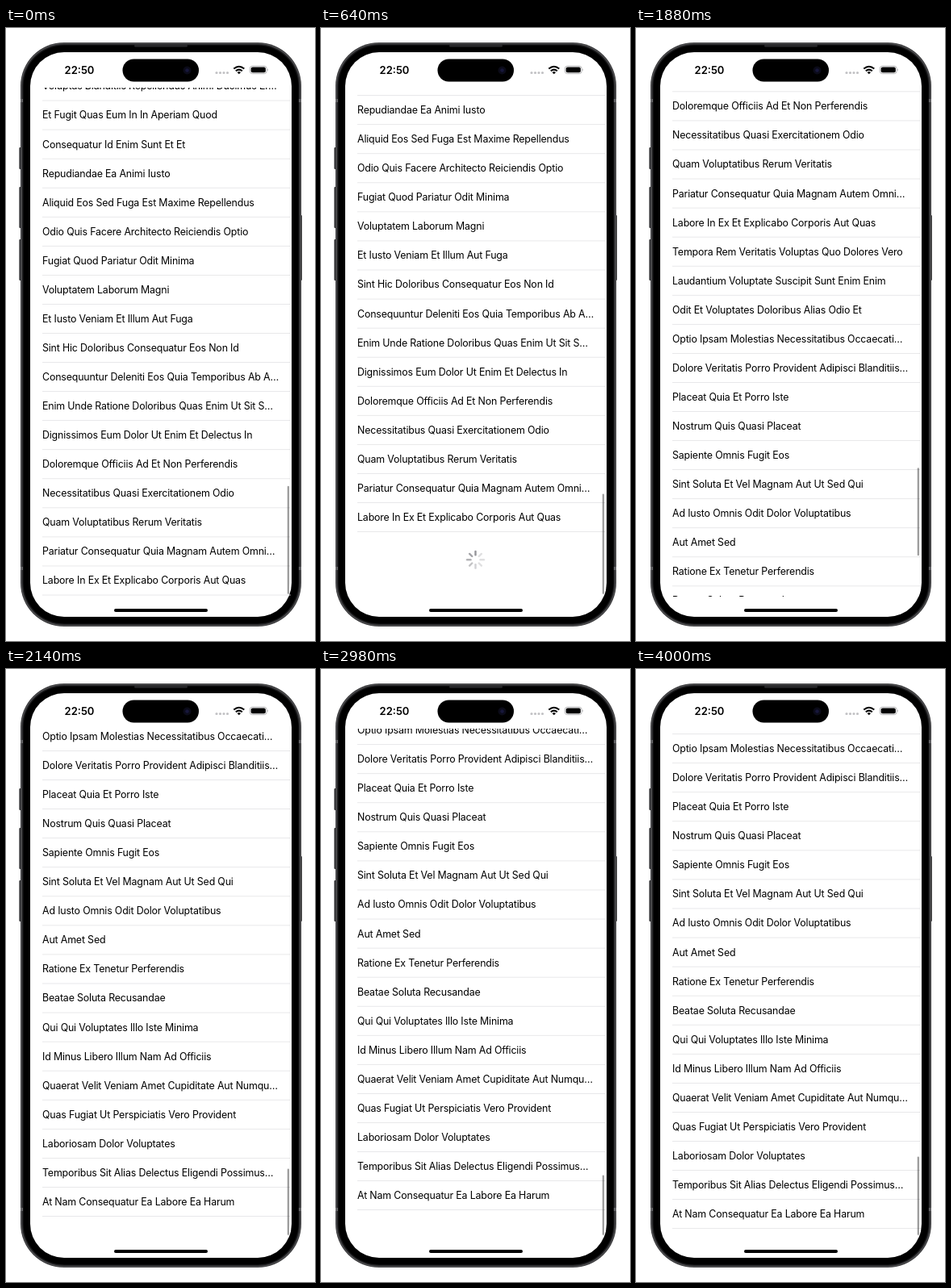
Animation, 383 px wide and 760 px high, one loop 4020 ms. Source, as an HTML page:

```html
<!DOCTYPE html>
<html lang="en">
<head>
<meta charset="utf-8">
<title>Endless list</title>
<style>
html, body { margin: 0; width: 100%; height: 100%; overflow: hidden; background: #fff; }
svg { display: block; width: 383px; height: 760px; }
text { font-family: Inter, Roboto, "Liberation Sans", sans-serif; }
.row { font-size: 12.4px; letter-spacing: -0.165px; }
.clock { font-size: 13px; font-weight: 600; text-anchor: middle; }
</style>
</head>
<body>
<svg viewBox="0 0 383 760">
  <defs>
    <clipPath id="view"><rect x="30" y="74" width="323" height="631"/></clipPath>
  </defs>

  <g id="phone"></g>

  <g clip-path="url(#view)">
    <rect id="mark" x="30" width="323" fill="#d1d1d6"/>
    <g id="list"><g id="spinner"></g></g>
    <rect id="bar" x="348.7" width="2.3" rx="1.15" fill-opacity=".38"/>
  </g>

  <!-- status bar -->
  <text class="clock" x="91" y="56.8">22:50</text>
  <rect x="144.5" y="38.5" width="94.5" height="28" rx="14"/>
  <circle cx="224.5" cy="52.5" r="5" fill="#0b0b18"/>
  <circle cx="224.5" cy="52.5" r="2.3" fill="#17173a"/>
  <path d="M261 55.500H276" stroke="#c2c2c5" stroke-width="3.2" stroke-linecap="round" stroke-dasharray="0 4.5"/>
  <g fill="none" stroke="#000" stroke-width="2">
    <path d="M282.300 50.600Q288.800 45 295.300 50.600"/>
    <path d="M284.800 53.300Q288.800 49.900 292.800 53.300"/>
  </g>
  <path d="M286.600 54.900Q288.800 53.200 291 54.900L288.800 57.200Z"/>
  <rect x="302.2" y="47.2" width="21" height="9.4" rx="3.2" fill="none" stroke="#a4a4a6" stroke-width=".8"/>
  <rect x="303.6" y="48.6" width="18.2" height="6.6" rx="2"/>
  <path d="M324.300 50.300Q326 51.900 324.300 53.500Z" fill="#a4a4a6"/>

  <rect x="134" y="720" width="116" height="4" rx="2"/>
</svg>
<script>
const LOOP = 4020, STEP = 20, ROW = 36.06, ANCHOR = 17, BOTTOM = 687;
const TRACK = 624, VIEW = 630, BAR_END = 702;
const FIRST_COUNT = 80, PAGE = 10, LAST_COUNT = 100;
const NS = 'http://www.w3.org/2000/svg';

const labels = `Voluptas Blanditiis Repellendus Animi Ducimus Er…
Et Fugit Quas Eum In In Aperiam Quod
Consequatur Id Enim Sunt Et Et
Repudiandae Ea Animi Iusto
Aliquid Eos Sed Fuga Est Maxime Repellendus
Odio Quis Facere Architecto Reiciendis Optio
Fugiat Quod Pariatur Odit Minima
Voluptatem Laborum Magni
Et Iusto Veniam Et Illum Aut Fuga
Sint Hic Doloribus Consequatur Eos Non Id
Consequuntur Deleniti Eos Quia Temporibus Ab A…
Enim Unde Ratione Doloribus Quas Enim Ut Sit S…
Dignissimos Eum Dolor Ut Enim Et Delectus In
Doloremque Officiis Ad Et Non Perferendis
Necessitatibus Quasi Exercitationem Odio
Quam Voluptatibus Rerum Veritatis
Pariatur Consequatur Quia Magnam Autem Omni…
Labore In Ex Et Explicabo Corporis Aut Quas
Tempora Rem Veritatis Voluptas Quo Dolores Vero
Laudantium Voluptate Suscipit Sunt Enim Enim
Odit Et Voluptates Doloribus Alias Odio Et
Optio Ipsam Molestias Necessitatibus Occaecati…
Dolore Veritatis Porro Provident Adipisci Blanditiis…
Placeat Quia Et Porro Iste
Nostrum Quis Quasi Placeat
Sapiente Omnis Fugit Eos
Sint Soluta Et Vel Magnam Aut Ut Sed Qui
Ad Iusto Omnis Odit Dolor Voluptatibus
Aut Amet Sed
Ratione Ex Tenetur Perferendis
Beatae Soluta Recusandae
Qui Qui Voluptates Illo Iste Minima
Id Minus Libero Illum Nam Ad Officiis
Quaerat Velit Veniam Amet Cupiditate Aut Numqu…
Quas Fugiat Ut Perspiciatis Vero Provident
Laboriosam Dolor Voluptates
Temporibus Sit Alias Delectus Eligendi Possimus…
At Nam Consequatur Ea Labore Ea Harum`.split('\n');

// Each swipe runs past the end of the list, then springs back to it.
// rows: how many rows below the anchor the list ends at
const swipes = [
  { start: -22, peak: 420, end: 800, over: 22, rows: 2 },
  { start: 1020, peak: 1280, end: 1520, over: 28.3, rows: 12 },
  { start: 1860, peak: 2120, end: 2400, over: 27, rows: 20 },
  { start: 2780, peak: 2940, end: 3260, over: 36, rows: 20 },
  { start: 3580, peak: 3770, end: 4100, over: 52, rows: 20 }
];

const $ = id => document.getElementById(id);
const phone = $('phone'), list = $('list'), spinner = $('spinner'), bar = $('bar'), mark = $('mark');

function add(parent, tag, attrs) {
  const el = document.createElementNS(NS, tag);
  for (const k in attrs) el.setAttribute(k, attrs[k]);
  return parent.appendChild(el);
}

const box = (x, y, width, height, fill, rx = 0) => add(phone, 'rect', { x, y, width, height, fill, rx });

function shell(inset, fill) {
  box(18 + inset, 18 + inset, 348 - 2 * inset, 724 - 2 * inset, fill, 54 - inset);
}

function drawPhone() {
  for (const [y, h] of [[148, 27], [197, 51], [262, 51]]) box(16.3, y, 5, h, '#3a3a3c', 1);
  box(362, 232, 4.9, 81, '#3a3a3c', 1);
  shell(0, '#363638');
  shell(0.9, '#545456');
  shell(2, '#1b1b1d');
  shell(3.6, '#000');
  for (const x of [18, 363]) for (const y of [88, 668]) box(x, y, 3, 4, '#626265');
  box(159, 20.5, 66, 3, '#29292b', 1.5);
  shell(12, '#fff');
}

const rowY = i => (i - ANCHOR) * ROW;
const restY = rows => BOTTOM - rows * ROW;

drawPhone();
mark.setAttribute('y', BOTTOM - ROW / 2);
mark.setAttribute('height', ROW);

const rows = labels.map((label, i) => {
  const g = add(list, 'g', { transform: `translate(0 ${rowY(i)})` });
  add(g, 'text', { class: 'row', x: 45, y: 4.5 }).textContent = label;
  add(g, 'rect', { x: 45, y: 17.7, width: 308, height: 0.75, fill: '#e1e1e3' });
  return g;
});

const spokes = Array.from({ length: 8 }, (_, i) => add(spinner, 'rect', {
  x: -1.2, y: -11.6, width: 2.4, height: 6.8, rx: 1.2, fill: '#3c3c43', transform: `rotate(${i * 45})`
}));

const rise = u => Math.sin(u * Math.PI / 2) ** 1.5;
const smooth = u => u * u * (3 - 2 * u);

// Height of the anchor row
function scrollAt(t) {
  let i = swipes.length - 1;
  while (t < swipes[i].start) i--;
  const { start, peak, end, over, rows } = swipes[i];
  const from = restY(i ? swipes[i - 1].rows : 0), to = restY(rows);
  if (t < peak) return from + (to - over - from) * rise((t - start) / (peak - start));
  return to - over * (1 - smooth(Math.min(1, (t - peak) / (end - peak))));
}

const show = (el, on) => el.style.display = on ? '' : 'none';
const within = (t, a, b) => t >= a && t < b;

function draw(t) {
  const y = scrollAt(t);
  const count = FIRST_COUNT + PAGE * ((t >= 760) + (t >= 1480));
  const shown = count - FIRST_COUNT + ANCHOR + 1;
  const loading = t >= 100 && count < LAST_COUNT;
  const extra = loading ? 2 : 0;

  list.setAttribute('transform', `translate(0 ${y})`);
  rows.forEach((row, i) => show(row, i < shown));

  show(spinner, loading);
  spinner.setAttribute('transform', `translate(191.5 ${rowY(shown - 1) + 52.8})`);
  const head = Math.floor(t / 71) + 7;
  spokes.forEach((s, i) => {
    const age = (head - i + 8) % 8;
    s.setAttribute('fill-opacity', Math.max(0.16, 0.55 - age * 0.08));
  });

  const total = (count + extra) * ROW;
  const over = restY(count - FIRST_COUNT + extra) - y;
  const size = TRACK * VIEW / total - Math.max(0, over);
  bar.setAttribute('y', BAR_END + Math.min(0, over) * TRACK / total - size);
  bar.setAttribute('height', size);

  show(mark, within(t, 1640, 1880) || within(t, 3360, 3600));
}

const start = performance.now();
function tick() {
  const t = (performance.now() - start) % LOOP;
  draw(Math.floor(t / STEP) * STEP);
  requestAnimationFrame(tick);
}
draw(0);
requestAnimationFrame(tick);
</script>
</body>
</html>
```
